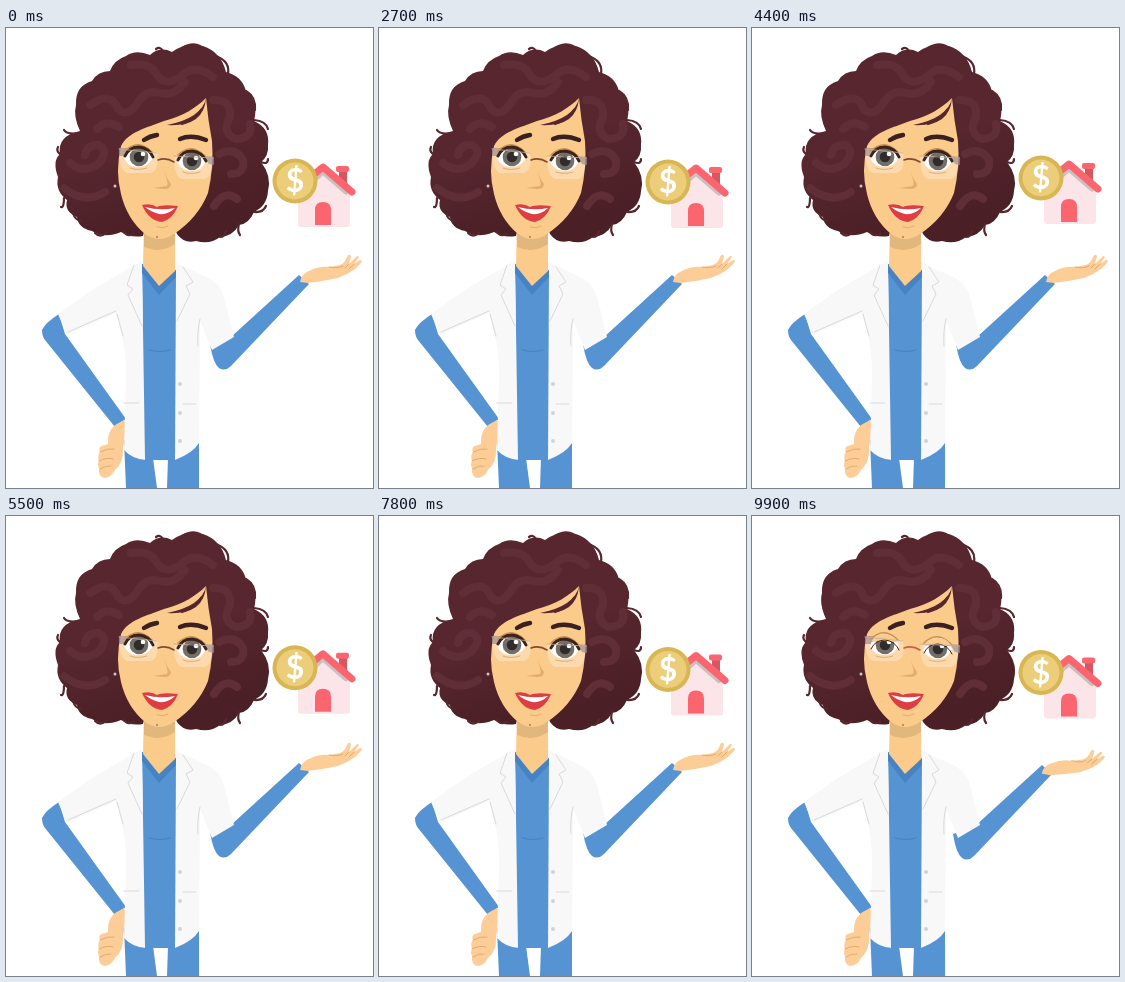
An HTML page for the animation above (10 s loop, 367 by 460 pixels).

```html
<!DOCTYPE html>
<html lang="en">
<head>
<meta charset="utf-8">
<title>Doctor with savings and home</title>
<style>
html, body { margin: 0; width: 100%; height: 100%; overflow: hidden; background: #fff; }
svg { display: block; width: 100vw; height: 100vh; }
.skin { fill: #fbcb8c; }
.palm { fill: #fdcd97; }
.blue { fill: #5593d2; }
.coat { fill: #f8f8f9; }
.hair { fill: #57262e; }
.line { fill: none; stroke-linecap: round; stroke-linejoin: round; }
.seam { stroke: #d9d9dc; stroke-width: 1; }
.fold { stroke: #e0ad70; stroke-width: 1; }
.curl { stroke: #602e36; stroke-width: 8; }
.wisp { stroke: #57262e; stroke-width: 2.2; }
.lash { stroke: #3d2219; stroke-width: 3; }
</style>
</head>
<body>
<svg viewBox="0 0 367 460" preserveAspectRatio="none">
  <defs>
    <clipPath id="eyeL"><path d="M118 130Q122 118 133 118Q143 119 147 130Q142 139 132 139Q122 139 118 130Z"/></clipPath>
    <clipPath id="eyeR"><path d="M171 134Q176 122 187 122Q197 123 200 133Q196 143 186 143Q176 143 171 134Z"/></clipPath>
    <clipPath id="hairClip"><use href="#hair"/></clipPath>
    <linearGradient id="shade" x1="0" y1="0" x2=".3" y2="1">
      <stop offset=".6" stop-color="#57262e"/><stop offset="1" stop-color="#4a1f25"/>
    </linearGradient>
  </defs>

  <!-- legs, arms and coat -->
  <path class="blue" d="M118 412H193V460H120Z"/>
  <path fill="#fff" d="M147 430H162L161 460H151Z"/>
  <g id="arm">
    <path class="blue" d="M204 316Q207 335 213 340Q219 344 225 338L303 256L293 247L225 309Z"/>
    <g id="hand" class="palm">
      <path d="M294 254Q295 246 303 243Q313 238 323 239L334 237Q339 235 341 229Q343 225 345 228L343 236L350 229Q352 227 353 229L348 236L354 232Q357 232 355 235L349 241Q341 247 332 250Q318 253 302 255Z"/>
      <path class="line fold" d="M323 239Q331 241 337 238M343 236L339 240M348 236L343 241"/>
    </g>
  </g>
  <path class="blue" d="M53 286Q39 295 36 302Q36 308 39 312L109 399L120 391L59 306Z"/>
  <path class="palm" d="M109 397L118 392Q121 395 119 408L117 420Q118 434 109 442Q105 450 98 450Q92 448 93 440Q91 437 93 433Q91 428 94 424Q92 419 96 418L102 416Q101 404 109 397Z"/>
  <path class="line fold" d="M94 424Q102 420 108 421M93 433Q101 429 107 431M94 441Q100 437 105 438"/>
  <path class="coat" d="M134 234Q111 247 86 262L52 286L61 307L110 285Q121 320 120 348L118 422Q126 431 140 432H169Q187 425 193 415L194 293L206 322L228 309L218 269Q215 257 203 250L171 235Z"/>
  <path class="blue" d="M136 236L170 242L169 432H139Z"/>
  <path fill="#4782c2" d="M136 236L153 257L170 242V249L153 267L136 245Z"/>
  <path class="skin" d="M138 194H169L169 243L153 258L137 238Z"/>
  <path fill="#e1b77c" d="M138 202Q154 216 169 205V216Q154 226 138 219Z"/>
  <path class="line" stroke="#4682c0" d="M143 322Q154 325 164 322"/>
  <path class="coat" d="M135 234L121 257L127 261L122 267L137 298L136 245ZM170 236L187 254L180 258L184 266L170 293Z"/>
  <path class="line seam" d="M128 237L121 257L127 261L122 267L136 298M177 239L187 254L180 258L184 266L171 293M194 291Q191 303 192 318M62 304L110 283M118 375H133M177 376H190M111 286L117 308"/>
  <g fill="#d3d3d5"><circle cx="174" cy="356" r="2"/><circle cx="174" cy="385" r="2"/><circle cx="174" cy="413" r="2"/></g>

  <!-- hair -->
  <path id="hair" fill="url(#shade)" d="M74 103Q67 88 70 77Q69 58 86 53Q92 43 104 43Q108 32 120 28Q130 21 144 27Q154 18 166 24Q181 13 197 18Q215 24 220 44Q236 48 240 63Q253 74 248 93Q264 100 262 117Q263 128 255 134Q266 148 262 163Q261 178 248 184Q243 196 233 197Q227 208 214 209Q204 217 190 213Q178 216 171 206L150 150L137 208Q124 210 115 204Q98 211 86 203Q72 200 71 189Q58 184 61 172Q49 163 52 149Q46 133 54 126Q51 108 74 103Z"/>
  <path class="line wisp" d="M73 105Q61 107 58 102M54 126Q50 123 52 119M58 170Q58 180 55 179M67 185Q69 192 75 193M157 23Q154 18 150 21M176 20Q186 14 194 18M212 29Q224 34 222 46M240 63Q250 69 249 82M248 92Q260 93 262 101M255 134Q262 137 262 131M248 184Q257 185 260 178M233 196Q231 203 234 207M214 209Q219 209 220 203M100 205Q94 210 89 205M128 206Q121 209 118 204"/>
  <g class="line curl" clip-path="url(#hairClip)">
    <path d="M84 77Q105 62 112 81Q121 90 131 76Q139 61 154 65Q169 69 179 54"/>
    <path d="M125 37Q145 34 151 47Q161 61 178 46Q190 36 207 49"/>
    <path d="M64 135Q77 146 92 136Q104 123 93 117Q81 116 79 127M91 101Q100 91 113 99"/>
    <path d="M58 160Q79 177 99 164"/>
    <path d="M207 72Q226 71 224 89Q215 105 230 111Q247 110 244 96"/>
    <path d="M213 126Q229 118 237 132Q239 146 225 146M208 178Q219 161 231 171"/>
  </g>

  <!-- face -->
  <path class="skin" d="M115 118C122 104 140 100 158 93C177 88 190 80 200 70Q202 92 206 113Q208 139 202 165Q192 190 168 206Q153 216 139 206Q121 191 115 166Q109 143 115 118Z"/>
  <path class="hair" d="M200 70Q196 90 161 97Q180 98 190 91Q199 84 200 70Z"/>
  <path class="line wisp" d="M195 82Q189 92 176 96"/>
  <path class="line" stroke="#3a2020" stroke-width="4.4" d="M138 112Q144 108 151 107M174 111Q185 106 200 112"/>
  <path fill="#fff" opacity=".29" d="M113 121L151 124Q154 143 144 145H121Q113 142 113 121ZM168 129L207 130Q207 148 199 151H176Q168 148 168 129Z"/>
  <path fill="#9d8d90" opacity=".7" d="M113 120H123L119 128H113ZM198 128L208 129V137L203 136Z"/>
  <g id="eyes"></g>
  <path class="line" stroke="#c4ab9b" stroke-width=".8" d="M113 121L151 125M168 128L207 130"/>
  <path id="bridge" class="line" stroke="#7f4b33" stroke-width="1.5" d="M152 132Q160 129 168 134"/>
  <path fill="#e3ad6d" d="M158 142Q161 151 165 156Q165 161 158 161L147 160Q154 159 161 158Q163 156 158 142Z"/>
  <path fill="#de3d42" d="M136 177Q145 175 151 179Q156 176 172 178Q167 191 156 194Q143 193 136 177Z"/>
  <path fill="#fff" d="M139 179Q154 183 169 180Q162 187 153 186Q145 184 139 179Z"/>
  <path class="line fold" d="M151 199Q157 201 162 198"/>
  <circle cx="151" cy="209" r="1" fill="#a67854"/>
  <circle cx="109" cy="158" r="1.5" fill="#cfcaca"/>

  <!-- house and coin -->
  <g id="home">
    <path fill="#fbe5e8" d="M292 160L317 139L344 160V196Q344 199 341 199H295Q292 199 292 196Z"/>
    <path class="line" stroke="#cdbfc0" stroke-width="5" d="M294 164L317 144L340 164"/>
    <path fill="#d5575f" d="M333 143H341V160L333 153Z"/>
    <rect x="330" y="138" width="13" height="6" rx="2" fill="#fb6570"/>
    <path class="line" stroke="#fb6570" stroke-width="7" d="M290 161L317 139L346 164"/>
    <path fill="#fb6570" d="M309 197V182Q309 174 317 174Q325 174 325 182V197Z"/>
    <circle cx="289" cy="153" r="22.5" fill="#d8b653"/>
    <circle cx="289" cy="153" r="18.5" fill="#ecce7a"/>
    <text x="289" y="164" text-anchor="middle" font-family="Lato, 'Open Sans', sans-serif" font-weight="700" font-size="32" fill="#fff">$</text>
  </g>
</svg>
<script>
const $ = id => document.getElementById(id);
const LOOP = 10000, STEP = 100;

// Time in seconds, vertical offset in pixels
const bob = [[0, 0], [1.4, -3], [2.7, 1], [3.3, 3.1], [4.4, -3], [4.9, -3.3],
  [5.8, 0], [6.7, 3.5], [7.8, .5], [8.6, -3.2], [9.9, 3.5]];

function smooth(keys, t) {
  let i = 0;
  while (i < keys.length - 2 && t > keys[i + 1][0]) i++;
  const slope = k => {
    const a = keys[Math.max(0, k - 1)], b = keys[Math.min(keys.length - 1, k + 1)];
    return (b[1] - a[1]) / (b[0] - a[0]);
  };
  const [ta, a] = keys[i], [tb, b] = keys[i + 1], d = tb - ta;
  const u = Math.min(1, (t - ta) / d), v = 1 - u;
  return v * v * (1 + 2 * u) * a + u * u * (3 - 2 * u) * b
    + d * u * v * (v * slope(i) - u * slope(i + 1));
}

function ramp(t, from, to) {
  const u = Math.min(1, Math.max(0, (t - from) / (to - from)));
  return u * u * (3 - 2 * u);
}

function eye(side, x, y) {
  return `<path class="line" stroke="#c98f52" stroke-width="1.6" d="M${x - 13} ${y - 6}Q${x} ${y - 19} ${x + 14} ${y - 5}"/>
    <g clip-path="url(#eye${side})">
      <rect x="${x - 18}" y="${y - 15}" width="36" height="32" fill="#fff"/>
      <circle cx="${x + 1}" cy="${y}" r="9.3" fill="#736e68"/>
      <circle cx="${x + 1}" cy="${y}" r="5.3" fill="#302c2b"/>
      <circle cx="${x + 5}" cy="${y - 3}" r="2.3" fill="#fff"/>
      <path class="lid skin" d="M${x - 20} ${y - 30}H${x + 20}V${y - 8}Q${x} ${y - 14} ${x - 20} ${y - 8}Z"/>
    </g>
    <path class="lash line" d="M${x - 13} ${y - 1}Q${x - 9} ${y - 10} ${x + 1} ${y - 10}Q${x + 11} ${y - 9} ${x + 15} ${y}"/>
    <path class="line fold" d="M${x - 8} ${y + 11}Q${x} ${y + 14} ${x + 9} ${y + 11}"/>`;
}

$('eyes').innerHTML = eye('L', 132, 129) + eye('R', 185, 133);
const lids = document.querySelectorAll('.lid');
const lashes = document.querySelectorAll('.lash');

function draw(ms) {
  const t = ms / 1000;
  const reach = ramp(t, 9.4, 9.9), blink = ramp(t, 9.6, 9.9);
  $('home').setAttribute('transform', `translate(0 ${smooth(bob, t).toFixed(2)})`);
  $('arm').setAttribute('transform', `translate(${-3 * reach} ${2 * reach})`);
  $('hand').setAttribute('transform', `translate(${-reach} ${2 * reach}) rotate(${4 * reach} 300 250)`);
  lids.forEach(lid => lid.setAttribute('transform', `translate(0 ${7 * blink})`));
  lashes.forEach(lash => {
    lash.setAttribute('transform', `translate(0 ${5 * blink})`);
    lash.style.strokeWidth = 3 - 2 * blink;
  });
  $('bridge').setAttribute('stroke', blink > .5 ? '#c95e4d' : '#7f4b33');
}

const start = performance.now();
function tick(now) {
  const ms = Math.max(0, now - start) % LOOP;
  draw(Math.floor(ms / STEP) * STEP);
  requestAnimationFrame(tick);
}
draw(0);
requestAnimationFrame(tick);
</script>
</body>
</html>
```
